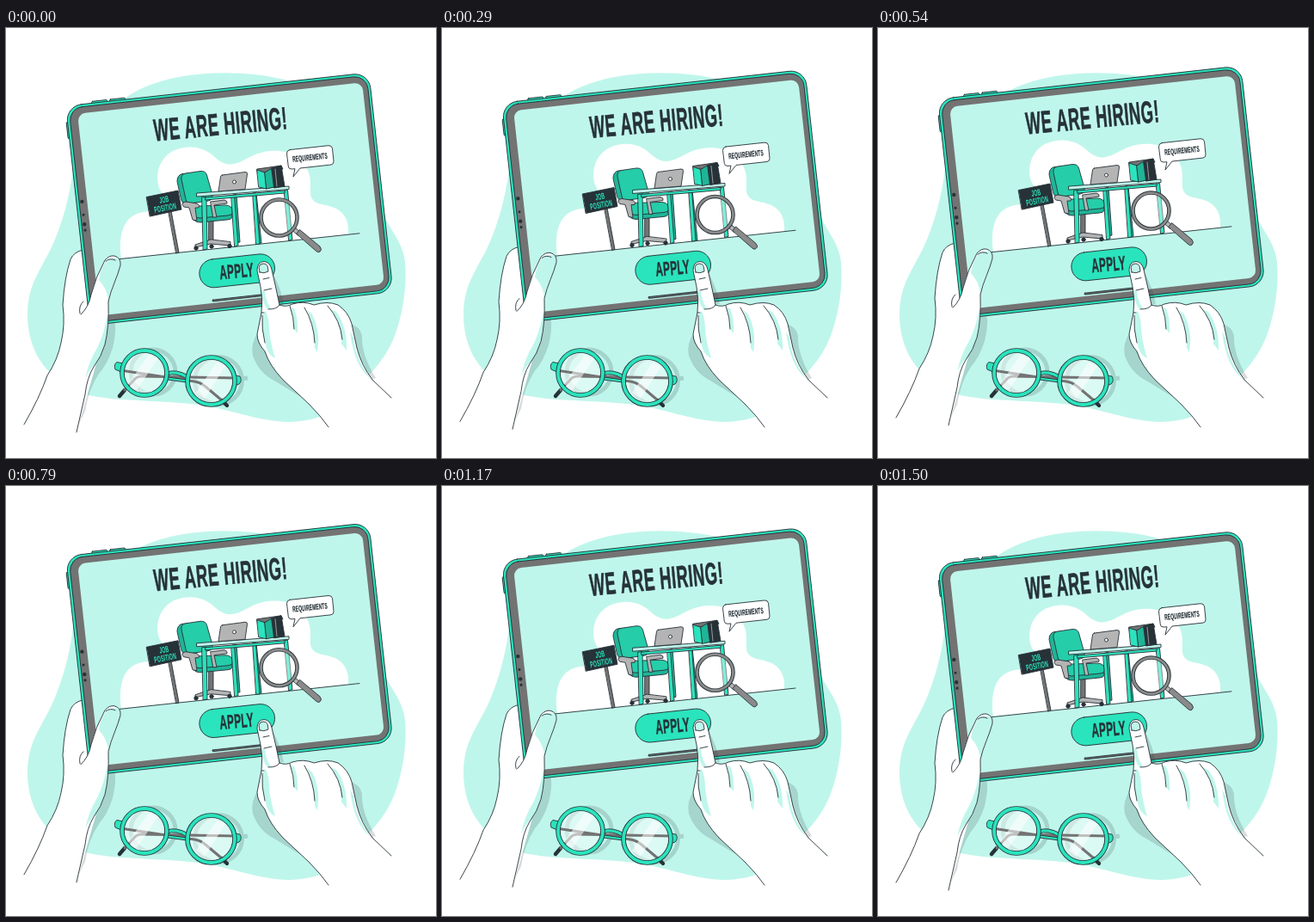
An HTML page for the animation above (1540 ms loop, 500 by 500 pixels).

```html
<!DOCTYPE html>
<html lang="en">
<head>
<meta charset="utf-8">
<title>We are hiring</title>
<style>
  html, body { margin: 0; width: 100%; height: 100%; overflow: hidden; background: #fff; }
  svg { display: block; width: 100%; height: 100%; }
  .ink { stroke: #263238; stroke-width: .9; stroke-linejoin: round; stroke-linecap: round; }
  .line { fill: none; }
  .teal { fill: #2ae4bd; }
  .mid { fill: #25cda9; }
  .deep { fill: #1fb598; }
  .pale { fill: #bff6eb; }
  .grey { fill: #737373; }
  .silver { fill: #b4b4b4; }
  .dark { fill: #263238; }
  .white { fill: #fff; }
  .shade { fill: #263238; opacity: .17; }
  text {
    font: bold 10px "Liberation Sans", Arial, sans-serif;
    letter-spacing: .03em; fill: #263238; stroke: #263238; stroke-width: .02em;
  }
  .sign text { fill: #2ae4bd; stroke: none; }
</style>
</head>
<body>
<svg viewBox="0 0 500 500">
  <!-- backdrop -->
  <path class="pale" d="M80 140C78 185 66 228 52 257C38 285 25 300 25 334C25 380 52 412 92 426C130 436 196 431 246 442C290 453 306 458 332 458C372 456 394 440 410 418C424 399 441 388 453 355C463 326 466 298 464 272C461 245 442 232 432 200C418 150 380 80 330 62C300 53 262 51 232 53C190 56 158 67 138 82Z"/>

  <!-- glasses -->
  <g class="line" stroke="#263238" stroke-width="5" opacity=".17">
    <circle cx="171" cy="400" r="26"/>
    <circle cx="247" cy="410" r="27.500"/>
    <path d="M274 408L281 407"/>
  </g>
  <g fill="#fff" fill-opacity=".45">
    <circle cx="161" cy="401" r="26"/>
    <circle cx="238.500" cy="410.500" r="27"/>
  </g>
  <g class="line" stroke-linecap="round" stroke-linejoin="round">
    <path stroke="#263238" stroke-width="4.400" d="M132 428L138 421M257 439L251 433"/>
    <path stroke="#737373" stroke-width="3" d="M138 421L149 409Q152 405 158 405L267 407M251 433L232 417Q226 412 219 411L133 398"/>
  </g>
  <g class="white" opacity=".55">
    <path d="M142 414L166 380L177 384L152 421Z"/>
    <path d="M221 424L245 389L255 393L231 431Z"/>
  </g>
  <g class="ink teal">
    <path d="M136 390L129 388.500Q125 391 127 397L134 400ZM266 404L272 405Q275 410 271 414L266 416Z"/>
    <path d="M187 400Q198 396 212 404L210 408Q198 400 187 404ZM188 406L211 409L210 412L188 409Z"/>
  </g>
  <g class="line">
    <g stroke="#263238" stroke-width="5.600">
      <circle cx="161" cy="401" r="26"/>
      <circle cx="238.500" cy="410.500" r="27.500"/>
    </g>
    <g stroke="#2ae4bd" stroke-width="3.800">
      <circle cx="161" cy="401" r="26"/>
      <circle cx="238.500" cy="410.500" r="27.500"/>
    </g>
  </g>

  <g id="float">
    <!-- left hand behind the tablet -->
    <path class="shade" d="M114 342L126 341Q129 350 124 372Q118 391 108 402Q96 420 92 446L84 462Z"/>
    <path class="white" d="M90 258Q79 260 75 269Q68 290 66 322Q69 345 64 366Q60 386 48 404Q39 430 21 461L82 470L118 345L110 270Z"/>
    <path class="ink line" d="M90 258Q79 260 75 269Q68 290 66 322Q69 345 64 366Q60 386 48 404Q39 430 21 461"/>

    <!-- tablet -->
    <g transform="translate(260 198.500) rotate(-6.300)">
      <g class="ink teal">
        <rect x="-147" y="-130" width="18" height="4" rx="1"/>
        <rect x="-126" y="-130" width="18" height="4" rx="1"/>
        <rect x="-179" y="-109" width="4" height="19" rx="1"/>
        <rect x="-177.500" y="-128" width="354.500" height="256.500" rx="18"/>
      </g>
      <rect class="ink grey" x="-174.300" y="-125" width="348.300" height="250.500" rx="15.500"/>
      <rect class="pale" x="-165" y="-117.500" width="333" height="236" rx="9"/>
      <g class="dark">
        <circle cx="-171" cy="-15.500" r="2.200"/>
        <circle cx="-171" cy="0" r="1.500"/>
        <circle cx="-171" cy="11" r="2.200"/>
        <circle cx="-171" cy="18" r="1.600"/>
      </g>
      <rect class="ink grey" x="-33" y="114.800" width="64" height="1.800" rx=".9"/>
    </g>

    <text transform="translate(173 131.500) rotate(-5.400) scale(.51 1)" style="font-size:36px">WE ARE HIRING!</text>

    <!-- cloud and floor -->
    <path class="white" d="M134 268C131 246 134 225 150 217C160 212 168 214 174 212C184 204 184 196 179 188C172 172 178 151 195 142.500C211 135.500 227 138 238 146C246 153 252 159 262 158.500C276 157 284 147 300 144C326 139 346 150 352 168C356 180 352 190 355 197C360 207 372 204 384 210C395 216 399 226 398 240Z"/>
    <path class="ink line" d="M124 269.500L411 238.800"/>

    <!-- sign -->
    <g class="sign">
      <path class="ink grey" d="M189 213L192 212.500L201 261L198 262Z"/>
      <path class="ink dark" d="M163.500 196.500L200 189L204 211L167.500 219Z"/>
      <text transform="translate(179 204) rotate(-11) scale(.51 1)" style="font-size:10.200px">JOB</text>
      <text transform="translate(173 215) rotate(-11) scale(.51 1)" style="font-size:10.200px">POSITION</text>
    </g>

    <!-- chair -->
    <g class="ink">
      <path class="grey" d="M236 224L241 224L241 248L236 248Z"/>
      <path class="silver" d="M238 246L220 252L220 255L238 251L261 253L261 249Z"/>
      <g class="dark">
        <circle cx="221" cy="256" r="2.200"/>
        <circle cx="239" cy="254" r="2.200"/>
        <circle cx="260" cy="253.500" r="2.200"/>
      </g>
      <path class="deep" d="M199 178Q199 171 205 169.500L215 169L222 203L212 205Q205 205 203.500 199Z"/>
      <path class="mid" d="M204 176Q203 170 209 169L226 166.500Q232 166 233.500 171L240 194Q241 200 235 201L214 204Q210 204 209 199Z"/>
      <path class="deep" d="M216 217L263 214L263 220Q262 223 257 223L226 226Q217 226 216 217Z"/>
      <path class="mid" d="M216 214Q217 208 225 207L255 206Q263 206 264 214Q263 218 258 218L225 221Q217 220 216 214Z"/>
      <path class="silver" d="M205 205Q205 202 209 202L222 204Q226 206 224 209L220 209L222 224L217 223L213 209L207 208Z"/>
      <path class="silver" d="M238 202L254 200Q258 201 257 204L242 206L245 220L241 220Z"/>
    </g>

    <!-- desk -->
    <g class="ink">
      <path class="deep" d="M264 194L268 193.500L272 249L268 249.500ZM288 192L291 192L297 250L293 250.500Z"/>
      <path class="teal" d="M228 197L233 196.500L234 257L229.500 258ZM262 195L265.500 194.500L270 253L266 254ZM287 192L290.500 192L295 251L291 251.500ZM323.500 189L327.500 188.500L333 246L329 247Z"/>
      <path class="teal" d="M232 197L324 189L324 192L232 200Z"/>
      <path class="pale" d="M222 192L329 184L329 187.500L222 196Z"/>
    </g>

    <!-- laptop and folders -->
    <g class="ink">
      <path class="silver" d="M251.500 171L278 167.500Q281 167.500 280.500 170L278 187.500L247 190L249.500 173Q250 171 251.500 171Z"/>
      <circle class="white" cx="265.500" cy="179" r="2"/>
      <path class="grey" d="M292 164L320 160L322 164L293 169Z"/>
      <path class="teal" d="M292 165L301 168L303 187L294 185Z"/>
      <path class="deep" d="M301 168L309 163L312 185L303 187Z"/>
      <path class="dark" d="M309 163L320 160L324 184L312 186Z"/>
      <path class="line" style="stroke:#a6a6a6" d="M313 164L315 184"/>
    </g>

    <!-- speech bubble -->
    <path class="ink white" d="M330 141.600L375 136.700Q379 136.500 379.500 140L381 155Q381.200 158.500 378 159L342 163L334 173L336 163.700L332 164Q328.500 164 328.300 161L326.500 146Q326.500 142 330 141.600Z"/>
    <text transform="translate(333.500 155.800) rotate(-5.800) scale(.51 1)" style="font-size:9.500px">REQUIREMENTS</text>

    <!-- magnifier -->
    <circle cx="317.500" cy="220.500" r="20" fill="#fff" opacity=".4"/>
    <path class="ink silver" d="M333 235L336 232L343 238L340 241Z"/>
    <path class="ink" fill="#8a8a8a" d="M338 239L341.500 234.500L365 254Q368 258 365 260Q363 262 359 258Z"/>
    <g class="line">
      <circle cx="317.500" cy="220.500" r="21" stroke="#263238" stroke-width="4.600"/>
      <circle cx="317.500" cy="220.500" r="21" stroke="#8a8a8a" stroke-width="2.800"/>
    </g>

    <!-- button -->
    <rect class="ink teal" x="-44" y="-16.500" width="88" height="33" rx="16.500" transform="translate(268.700 282.300) rotate(-6.200)"/>
    <text transform="translate(249 292.300) rotate(-5) scale(.51 1)" style="font-size:23px">APPLY</text>

    <!-- thumb and palm -->
    <path class="white" d="M87 333Q96 325 99 310Q104 290 115 270Q120 264 126 265Q134 267 133 276C130 289 122 303 119 318Q120 348 115 368Q111 382 102 394Q94 407 92 426L82 470L40 455L72 390Z"/>
    <path class="pale" d="M116 271Q109 283 108 293Q116 301 119 315Q123 300 129 288Q135 274 131 268Q122 266 116 271ZM118 334Q114 356 106 372Q96 388 92 408Q96 398 104 391Q117 374 119 340Z"/>
    <path class="ink line" d="M87 333Q96 325 99 310Q104 290 115 270Q120 264 126 265Q134 267 133 276C130 289 122 303 119 318Q120 348 115 368Q111 382 102 394Q94 407 92 426L82 470M90 318Q84 323 86 332M116 271Q121 267 127 270"/>
  </g>

  <!-- right hand -->
  <path class="shade" d="M308 280Q315 294 319 305L323 321L315 321ZM294 353Q284 366 287 381Q294 401 312 410L346 431L300 372ZM399 343Q412 347 414 358Q413 380 430 407L425 409L408 375Z"/>
  <path class="white" d="M297 331Q299 316 296 301L292 282Q292 272 300 271.500Q307 272 309 281L314 303L318 322Q326 325 333 321Q346 317 358 322Q374 317 386 322Q398 330 402 344L408 372Q413 392 426 409L448 430L375 464Q366 451 352 437L322 409Q306 392 301 376Q292 366 292 356Z"/>
  <g class="pale">
    <path d="M299 333Q296 350 301 363Q303 380 313 384Q307 365 306 350Q306 338 302 329Z"/>
    <path d="M297 306Q299 322 304 327L308 326Q302 318 301 306ZM331 325Q335 337 335 350L339 355Q340 338 335 326ZM350 328Q359 346 359 372L362 377Q366 352 356 333ZM377 327Q391 344 390 367L396 375Q397 348 384 330ZM400 353L404 360Q406 385 424 408Q405 394 400 353Z"/>
  </g>
  <path class="ink line" d="M297 331Q299 316 296 301L292 282Q292 272 300 271.500Q307 272 309 281L314 303L318 322Q326 325 333 321Q346 317 358 322Q374 317 386 322Q398 330 402 344L408 372Q413 392 426 409L448 430M375 464Q366 451 352 437L322 409Q306 392 301 376Q292 366 292 356L297 331L300 331M298 334Q297 350 301 366M318 322Q316 327 305 327M330 323Q335 337 335 350M347 325Q358 343 359 366M374 323Q389 340 391 362M299 292L306 290.500M300 305L309 303"/>
  <path class="ink pale" d="M295 284L294 278Q295 274 299 274Q304 274 304.500 279L305 283Q300 286 295 284Z"/>
</svg>
<script>
  const LOOP = 1540, STEP = 1000 / 24, RISE = 4.7, LEAD = 35;
  const float = document.getElementById('float');
  const wave = t => RISE * Math.cos(2 * Math.PI * (t + LEAD) / LOOP);
  const start = performance.now();

  function draw(now) {
    const t = Math.max(0, now - start) % LOOP;
    const held = Math.floor((t + 3) / STEP) * STEP;
    float.setAttribute('transform', `translate(0 ${(wave(held) - wave(0)).toFixed(2)})`);
    requestAnimationFrame(draw);
  }
  draw(start);
</script>
</body>
</html>
```
